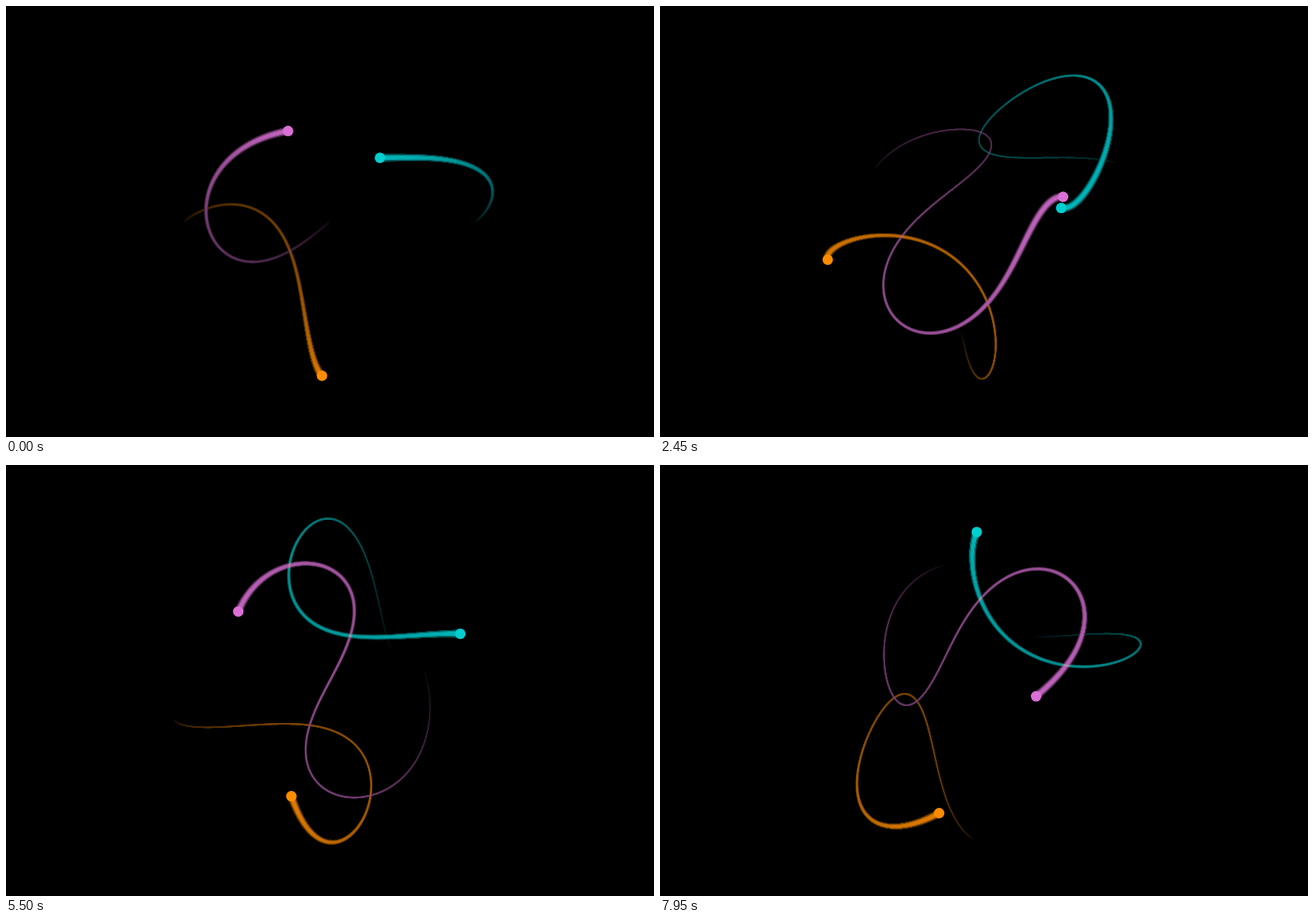
An HTML page with a canvas that plays this animation: 800x533 px, repeating every 8 s.

```html
<!DOCTYPE html>
<html lang="en">
<head>
<meta charset="utf-8">
<title>Three-body orbit</title>
<style>
  html, body { margin: 0; width: 100%; height: 100%; overflow: hidden; background: #000; }
  canvas { display: block; }
</style>
</head>
<body>
<canvas id="stage" width="800" height="533"></canvas>
<script>
const ctx = document.getElementById('stage').getContext('2d');

const LOOP_MS = 8000, FRAME_MS = 50;
const CENTER_X = 400, CENTER_Y = 266.5, SCALE_X = 180, SCALE_Y = 176;
const FRAME_TIME = 0.06384;            // orbit time that passes per frame
const SAMPLES = 16, SUBSTEPS = 8;      // path samples per frame, solver steps per sample
const FIRST_HEAD = 514;                // sample at which the loop begins
const TRAIL = 60 * SAMPLES;
const DOT_RADIUS = 6.5;
const COLORS = [[255, 140, 0], [0, 206, 209], [218, 112, 214]];

// Equal masses on a line with zero angular momentum: a periodic orbit.
const VX = 0.4644451728, VY = 0.3960600146;
const START = {
  pos: [-1, 0, 1, 0, 0, 0],
  vel: [VX, VY, VX, VY, -2 * VX, -2 * VY]
};

function gravity(pos) {
  const acc = [0, 0, 0, 0, 0, 0];
  for (let i = 0; i < 6; i += 2) {
    for (let j = i + 2; j < 6; j += 2) {
      const dx = pos[j] - pos[i], dy = pos[j + 1] - pos[i + 1];
      const r2 = dx * dx + dy * dy, pull = 1 / (r2 * Math.sqrt(r2));
      acc[i] += dx * pull;
      acc[i + 1] += dy * pull;
      acc[j] -= dx * pull;
      acc[j + 1] -= dy * pull;
    }
  }
  return acc;
}

const addScaled = (a, b, k) => a.map((value, i) => value + b[i] * k);

// One Runge-Kutta step of fourth order.
function advance({ pos, vel }, h) {
  const a1 = gravity(pos);
  const v2 = addScaled(vel, a1, h / 2), a2 = gravity(addScaled(pos, vel, h / 2));
  const v3 = addScaled(vel, a2, h / 2), a3 = gravity(addScaled(pos, v2, h / 2));
  const v4 = addScaled(vel, a3, h), a4 = gravity(addScaled(pos, v3, h));
  const blend = (start, k1, k2, k3, k4) =>
    start.map((s, i) => s + h / 6 * (k1[i] + 2 * k2[i] + 2 * k3[i] + k4[i]));
  return { pos: blend(pos, vel, v2, v3, v4), vel: blend(vel, a1, a2, a3, a4) };
}

function computePath() {
  const count = FIRST_HEAD + SAMPLES * LOOP_MS / FRAME_MS;
  const path = [];
  let state = START;
  for (let n = 0; n <= count; n++) {
    path.push(state.pos.map((v, i) => i % 2 ? CENTER_Y - SCALE_Y * v : CENTER_X + SCALE_X * v));
    for (let k = 0; k < SUBSTEPS; k++) state = advance(state, FRAME_TIME / SAMPLES / SUBSTEPS);
  }
  return path;
}

const path = computePath();

const shade = (color, level) => `rgb(${color.map(c => Math.round(c * level)).join()})`;

function drawSegment(n, body, width, level) {
  const from = path[n - 1], to = path[n], i = body * 2;
  ctx.lineWidth = width;
  ctx.strokeStyle = shade(COLORS[body], level);
  ctx.beginPath();
  ctx.moveTo(from[i], from[i + 1]);
  ctx.lineTo(to[i], to[i + 1]);
  ctx.stroke();
}

// Opacity falls along the visible trail, width falls with age; the edge is soft where it is wide.
function drawTrail(head, body) {
  const tail = Math.max(0, head - TRAIL);
  for (let n = tail + 1; n <= head; n++) {
    const level = 0.88 * ((n - tail) / (head - tail)) ** 0.6;
    const width = 1.4 + 8.5 * (1 - (head - n) / TRAIL) ** 2.5;
    drawSegment(n, body, width, level * 0.35);
    drawSegment(n, body, Math.max(width * 0.72, Math.min(width, 2)), level * 0.7);
    drawSegment(n, body, Math.max(width * 0.45, Math.min(width, 2)), level);
  }
}

function drawDot(head, body) {
  ctx.fillStyle = shade(COLORS[body], 1);
  ctx.beginPath();
  ctx.arc(path[head][body * 2], path[head][body * 2 + 1], DOT_RADIUS, 0, Math.PI * 2);
  ctx.fill();
}

function draw(frame) {
  const head = FIRST_HEAD + frame * SAMPLES;
  ctx.globalCompositeOperation = 'source-over';
  ctx.fillStyle = '#000';
  ctx.fillRect(0, 0, 800, 533);
  ctx.lineCap = 'round';
  ctx.globalCompositeOperation = 'lighten';
  COLORS.forEach((_, body) => drawTrail(head, body));
  ctx.globalCompositeOperation = 'source-over';
  COLORS.forEach((_, body) => drawDot(head, body));
}

let shown = -1;
const startTime = performance.now();

function tick() {
  const frame = Math.floor((performance.now() - startTime) % LOOP_MS / FRAME_MS);
  if (frame !== shown) draw(shown = frame);
  requestAnimationFrame(tick);
}
tick();
</script>
</body>
</html>
```
